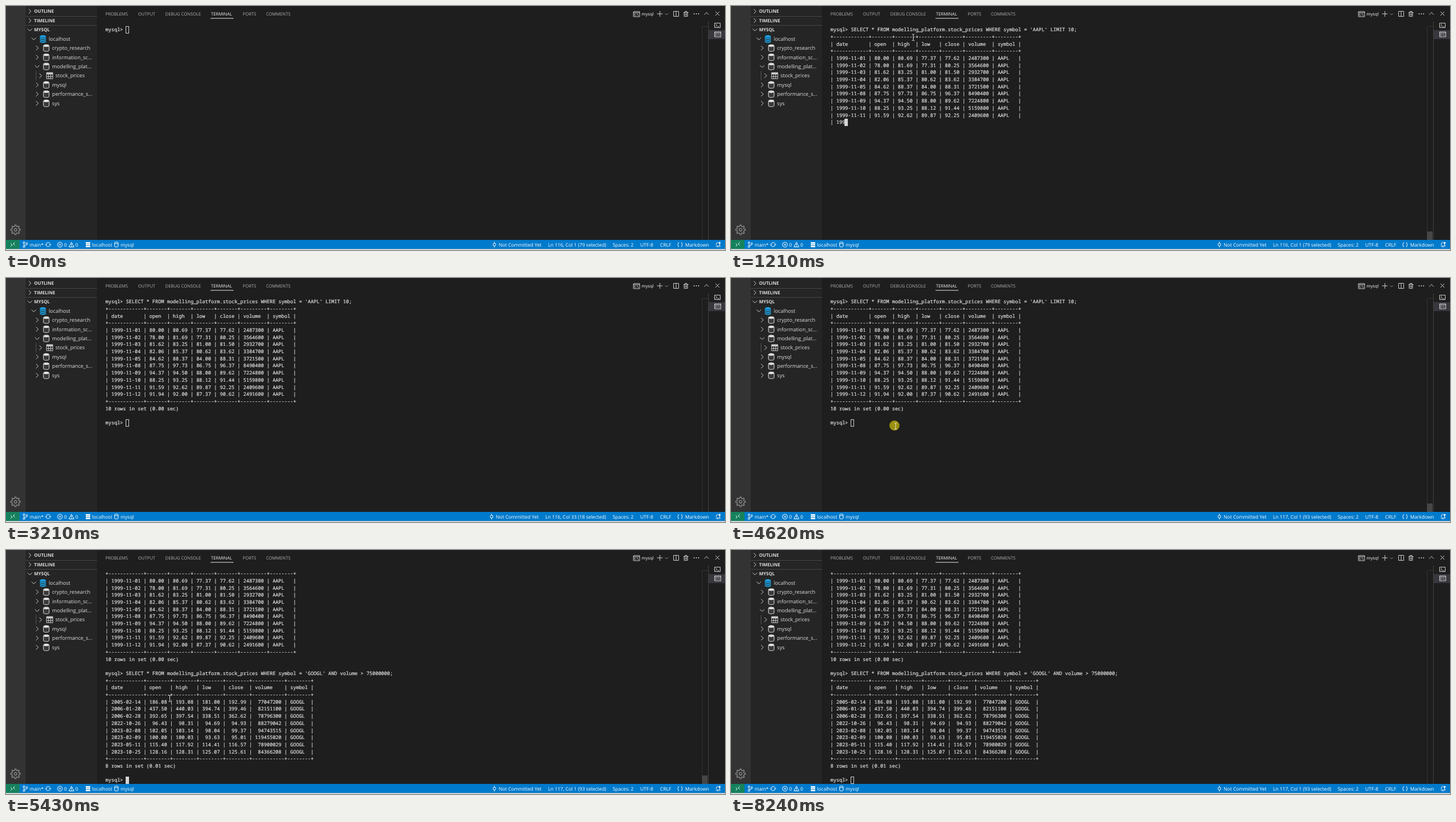
Recreate the animation shown at these times as an HTML page. Size 1280x435 px, loop 8440 ms.

```html
<!DOCTYPE html>
<html lang="en">
<head>
<meta charset="utf-8">
<title>Terminal query</title>
<style>
  html, body { margin: 0; width: 100%; height: 100%; overflow: hidden; background: #1e1e1e; }
  svg.stage { display: block; width: 100vw; height: 100vh; }
  text { white-space: pre; text-rendering: geometricPrecision; fill: #dedede; }
  .ui text { font-family: "Open Sans", "Noto Sans", sans-serif; }
  .head text { font-size: 8px; font-weight: 700; }
  .tree text { font-size: 9.2px; }
  .tabs text { font-size: 7.75px; fill: #b2b2b2; }
  .tabs .active { fill: #f4f4f4; }
  .status text { font-size: 8.6px; fill: #fff; }
  .term text { font: 8.71px "Noto Sans Mono", "DejaVu Sans Mono", monospace; stroke: #dedede; stroke-width: .22; }
  .line { fill: none; stroke: #d0d0d0; stroke-width: 1; }
  .status .line { stroke: #fff; }
</style>
</head>
<body>
<svg class="stage" viewBox="0 0 1280 435" preserveAspectRatio="none">
  <defs>
    <path id="right" class="line" d="M-2-4 2 0-2 4"/>
    <path id="down" class="line" d="M-4-2 0 2 4-2"/>
    <g id="db">
      <path d="M-5-4.2C-5-6.6 5-6.6 5-4.2V4.2C5 6.6-5 6.6-5 4.2Z" fill="#3a3a3a" stroke="#e4e4e4"/>
      <ellipse cy="-4" rx="4.6" ry="1.9" fill="#e4e4e4"/>
    </g>
    <g id="host" fill="#1ba1e2">
      <ellipse cy="-4.2" rx="5.5" ry="2.2"/>
      <path id="disk" d="M-5.5-2.9Q0 .4 5.5-2.9V-.7Q0 2.4-5.5-.7Z"/>
      <use href="#disk" y="3.2"/>
      <use href="#disk" y="6.4"/>
    </g>
    <g id="grid">
      <path d="M-5.5-5.5h11v11h-11z" class="line"/>
      <path d="M-5.5-5h11v2.6h-11z" fill="#d8d8d8"/>
      <path class="line" d="M-5.5 1.5h11M-1.8-3V5M1.9-3V5"/>
    </g>
    <g id="cmd">
      <path class="line" d="M-5.5-4.5h11v9h-11zM-5.5-2.5h11"/>
      <path class="line" stroke-width=".8" d="M-2-.5Q-4-.9-4 1T-2 2.5M-.4 0v.8M-.4 2v.8M1.3-.8 3.4 3"/>
    </g>
    <g id="ibeam" fill="none" stroke="#f0f0f0" stroke-width=".9">
      <path d="M-2.3-5.5H-.6L0-5 .6-5.5H2.3M0-5V5M-2.3 5.5H-.6L0 5 .6 5.5H2.3"/>
    </g>
    <path id="arrow" d="M.5.5V14l3.1-2.8 2.2 5 2.2-1-2.2-4.8h4.6Z" fill="#fff" stroke="#000" stroke-width=".8"/>
    <path id="hand" d="M3.2 8V1.6Q4.2 0 5.2 1.6V6.2Q10.5 6.6 10.5 9V12.5L9 16.4H4L.6 11Q.5 9.2 2 10L3.2 11Z"
          fill="#fff" stroke="#000" stroke-width=".8"/>
  </defs>

  <rect width="1280" height="435" fill="#1e1e1e"/>
  <rect width="35" height="418" fill="#333"/>
  <rect x="35" width="127" height="418" fill="#252526"/>

  <g class="ui head">
    <path d="M35 18.5H162M35 34.5H162" stroke="#48484a"/>
    <use href="#right" x="42.5" y="9.5"/><text x="50" y="12.3">OUTLINE</text>
    <use href="#right" x="42.5" y="26"/><text x="50" y="28.8">TIMELINE</text>
    <use href="#down" x="42.5" y="42.5"/><text x="50" y="45.3">MYSQL</text>
  </g>
  <g class="ui tree" id="tree">
    <path d="M53.5 116V132.5" stroke="#585858"/>
  </g>
  <g id="gear" transform="translate(17 399)" fill="none" stroke="#909090" stroke-width="1.3">
    <circle r="2.4"/>
  </g>

  <g class="ui tabs">
    <text x="177" y="17">PROBLEMS</text>
    <text x="235" y="17">OUTPUT</text>
    <text x="283.5" y="17">DEBUG CONSOLE</text>
    <text x="365" y="17" class="active">TERMINAL</text>
    <text x="421.5" y="17">PORTS</text>
    <text x="463" y="17">COMMENTS</text>
    <path d="M364 22H405" stroke="#e7e7e7"/>
    <use href="#cmd" x="1122.5" y="14.5"/>
    <text x="1131.5" y="17" class="active">mysql</text>
    <path class="line" d="M1159 14H1169M1164 9V19"/>
    <use href="#down" transform="translate(1176 14.5) scale(.65)"/>
    <path class="line" d="M1188.5 9.5h9v9h-9zM1193 9.5v9"/>
    <path class="line" d="M1206 11.5h9M1209 11V9.5h3V11M1207.3 12V18.5h6V12M1209.3 13v4M1211.5 13v4"/>
    <path d="M1224 14h2m2 0h2m2 0h2" stroke="#d0d0d0" stroke-width="1.6"/>
    <use href="#down" transform="translate(1247 13.5) scale(1 -1)"/>
    <path class="line" d="M1263 10 1270 17M1270 10 1263 17"/>
  </g>

  <path d="M1239.5 417V36.5H1250" fill="none" stroke="#343434"/>
  <rect x="1250" y="43" width="30" height="16" fill="#37373d"/>
  <path d="M1250.5 27V417" stroke="#414141"/>
  <path class="line" d="M1261.5 30.5h10v8h-10zM1263.5 32.5 1266 34.5 1263.5 36.5M1266.5 36.8h3"/>
  <use href="#cmd" x="1267" y="50.5"/>
  <rect id="thumb" x="1239" y="402" width="10" height="15" fill="#464646"/>

  <g class="ui status">
    <rect y="417" width="1280" height="16.3" fill="#007acc"/>
    <rect y="417" width="24" height="16.3" fill="#16825d"/>
    <rect y="433.3" width="1280" height="1.7" fill="#e8edf0"/>
    <path class="line" d="M8.5 423.5 11 426 8.5 428.7M15.5 421.5 13 424 15.5 426.5"/>
    <g class="line">
      <circle cx="32" cy="422" r="1.5"/><circle cx="32" cy="429" r="1.5"/><circle cx="37" cy="423.5" r="1.5"/>
      <path d="M32 423.5V427.5M37 425Q37 427 32.5 427"/>
      <path d="M71.2 425A4 4 0 0 1 78.5 423.5M78.8 425.5A4 4 0 0 1 71.5 427.2M77 425h3.5M69.5 426h3.5"/>
      <circle cx="96" cy="425.5" r="4.4"/><path d="M94 423.5 98 427.5M98 423.5 94 427.5"/>
      <path d="M116.5 421 121 429.5H112ZM116.5 424V427M116.5 427.8v1"/>
      <ellipse cx="196.5" cy="422.3" rx="3.2" ry="1.5"/>
      <path d="M193.3 422.3V428.6Q196.5 431 199.7 428.6V422.3"/>
      <path d="M1198 421.5Q1196.5 421.5 1196.8 424L1195.7 425.5 1196.8 427Q1196.5 429.5 1198 429.5M1202 421.5Q1203.5 421.5 1203.2 424L1204.3 425.5 1203.2 427Q1203.5 429.5 1202 429.5"/>
      <path d="M1263.5 428H1271.5L1270.3 426V424M1264.7 426V424Q1265 421.5 1267.5 421.3M1266.5 429.7h2"/>
    </g>
    <circle cx="1270.3" cy="422.3" r="1.8" fill="#fff"/>
    <path d="M142 421h8v2.4h-8zm0 3.2h8v2.4h-8zm0 3.2h8v2.6h-8z" fill="#fff"/>
    <text x="42" y="428.8">main*</text>
    <text x="103.5" y="428.8">0</text>
    <text x="123.5" y="428.8">0</text>
    <text x="153" y="428.8">localhost</text>
    <text x="204" y="428.8">mysql</text>
    <g id="commit">
      <circle class="line" cx="869.5" cy="425.5" r="2.5" stroke-width="1.3"/>
      <path class="line" d="M869.5 420.5V423M869.5 428V430.5"/>
      <text x="877" y="428.8">Not Committed Yet</text>
      <text x="965" y="428.8" id="position"></text>
    </g>
    <text x="1080" y="428.8">Spaces: 2</text>
    <text x="1129" y="428.8">UTF-8</text>
    <text x="1164.5" y="428.8">CRLF</text>
    <text x="1209" y="428.8">Markdown</text>
  </g>

  <g class="term" id="term"><rect id="cursor" height="12" stroke="#d4d4d4"/></g>
  <circle id="click" r="9" fill="#999010"/>
  <use id="pointer"/>
</svg>

<script>
const LOOP = 8440, CHAR = 5.226, LEFT = 177, TOP = 36, PITCH = 12.7, BASELINE = 9.1;
const $ = id => document.getElementById(id);

function add(parent, tag, attrs, content = "") {
  const el = document.createElementNS("http://www.w3.org/2000/svg", tag);
  set(el, attrs);
  el.textContent = content;
  return parent.appendChild(el);
}
function set(el, attrs) {
  for (const key in attrs) el.setAttribute(key, attrs[key]);
}
const show = (el, on) => { el.style.visibility = on ? "visible" : "hidden"; };

// Sidebar tree: [label, indent, icon, chevron]
[
  ["localhost", -6, "host", "down"],
  ["crypto_research", 0, "db", "right"],
  ["information_sc...", 0, "db", "right"],
  ["modelling_plat...", 0, "db", "down"],
  ["stock_prices", 6, "grid", "right"],
  ["mysql", 0, "db", "right"],
  ["performance_s...", 0, "db", "right"],
  ["sys", 0, "db", "right"],
].forEach(([label, indent, icon, chevron], i) => {
  const y = 58.5 + i * 16.43;
  add($("tree"), "use", { href: "#" + chevron, x: 55.5 + indent, y });
  add($("tree"), "use", { href: "#" + icon, x: 71.7 + indent, y });
  add($("tree"), "text", { x: 82 + indent, y: y + 3.2 }, label);
});

// Gear outline: eight teeth
const teeth = Array.from({ length: 32 }, (_, i) => {
  const angle = (i - 0.5) * Math.PI / 16, r = i % 4 < 2 ? 8.6 : 6.2;
  return `${(r * Math.cos(angle)).toFixed(2)} ${(r * Math.sin(angle)).toFixed(2)}`;
});
add($("gear"), "path", { d: `M${teeth.join("L")}Z` });

// Terminal contents
function table(data) {
  const rows = ["date open high low close volume symbol", ...data.trim().split("\n")]
    .map(row => row.trim().split(/\s+/));
  const widths = rows[0].map((_, c) => Math.max(...rows.map(row => row[c].length)));
  const rule = "+" + widths.map(w => "-".repeat(w + 2)).join("+") + "+";
  const lines = rows.map((row, r) => "| " + row.map((cell, c) =>
    r === 0 || c === 6 ? cell.padEnd(widths[c]) : cell.padStart(widths[c])).join(" | ") + " |");
  return [rule, lines[0], rule, ...lines.slice(1), rule];
}

const prompt = "mysql> ";
const select = prompt + "SELECT * FROM modelling_platform.stock_prices WHERE symbol = ";
const first = [
  select + "'AAPL' LIMIT 10;",
  ...table(`
    1999-11-01 80.00 80.69 77.37 77.62 2487300 AAPL
    1999-11-02 78.00 81.69 77.31 80.25 3564600 AAPL
    1999-11-03 81.62 83.25 81.00 81.50 2932700 AAPL
    1999-11-04 82.06 85.37 80.62 83.62 3384700 AAPL
    1999-11-05 84.62 88.37 84.00 88.31 3721500 AAPL
    1999-11-08 87.75 97.73 86.75 96.37 8490400 AAPL
    1999-11-09 94.37 94.50 88.00 89.62 7224800 AAPL
    1999-11-10 88.25 93.25 88.12 91.44 5159800 AAPL
    1999-11-11 91.59 92.62 89.87 92.25 2409600 AAPL
    1999-11-12 91.94 92.00 87.37 90.62 2491600 AAPL`),
  "10 rows in set (0.00 sec)", "",
];
const second = [
  select + "'GOOGL' AND volume > 75000000;",
  ...table(`
    2005-02-14 186.08 193.08 181.00 192.99 77047200 GOOGL
    2006-01-20 437.50 440.03 394.74 399.46 82151100 GOOGL
    2006-02-28 392.65 397.54 338.51 362.62 78796300 GOOGL
    2022-10-26 96.43 98.31 94.69 94.93 88279042 GOOGL
    2023-02-08 102.05 103.14 98.04 99.37 94743515 GOOGL
    2023-02-09 100.00 100.03 93.63 95.01 119455020 GOOGL
    2023-05-11 115.40 117.92 114.41 116.57 78900029 GOOGL
    2023-10-25 128.16 128.31 125.07 125.61 84366208 GOOGL`),
  "8 rows in set (0.01 sec)", "",
];

// Tracks of [start time, value]; each value holds until the next one
const screens = [
  [0, [prompt]],
  [1210, [...first.slice(0, 13), "| 199"]],
  [1410, [...first, prompt]],
  [5230, [...first, select.slice(0, 57)]],
  [5430, [...first.slice(3), ...second, prompt]],
];
const focus = [[0, false], [810, true], [3210, false], [4820, true], [8240, false]];
const thumb = [[0, false], [400, true], [2810, false], [4420, true], [7230, false]];
const positions = [
  [0, "Ln 116, Col 1 (79 selected)"],
  [3210, "Ln 116, Col 33 (18 selected)"],
  [3420, "Ln 117, Col 1 (93 selected)"],
];
const clicks = [[0, null], [810, [323, 56]], [1010, null], [4620, [291, 263]], [4820, null]];
const pointers = [
  [0, null], [200, ["arrow", 1157, 399]], [400, ["ibeam", 387, 109]],
  [610, ["ibeam", 328, 61]], [810, ["ibeam", 324.5, 56]], [2410, null],
  [4220, ["ibeam", 324.5, 189]], [4420, ["ibeam", 306, 242]],
  [4620, ["ibeam", 293, 264]], [5020, ["ibeam", 291.5, 264.7]],
  [6430, ["ibeam", 309.5, 271]], [6630, ["ibeam", 860, 419]],
  [6830, ["hand", 1233, 418]], [7230, null],
];
const tracks = [screens, focus, thumb, positions, clicks, pointers];
const valueAt = (track, t) => track.findLast(([start]) => start <= t)[1];
const cuts = [...new Set(tracks.flat().map(([start]) => start))].sort((a, b) => a - b);

const rows = Array.from({ length: 30 }, (_, i) =>
  add($("term"), "text", { x: LEFT, y: TOP + BASELINE + i * PITCH }));

function draw(t) {
  const [lines, focused, scrolling, position, click, pointer] = tracks.map(track => valueAt(track, t));
  rows.forEach((row, i) => { row.textContent = lines[i] || ""; });
  const last = lines.length - 1;
  set($("cursor"), {
    x: Math.round(LEFT + lines[last].length * CHAR) - 0.5,
    y: Math.round(TOP + last * PITCH) + 0.5,
    width: 5,
    fill: focused ? "#d4d4d4" : "none",
  });
  show($("thumb"), scrolling);
  $("position").textContent = position;
  $("commit").setAttribute("transform", `translate(${position.includes("Col 33") ? -5 : 0} 0)`);
  show($("click"), click);
  if (click) set($("click"), { cx: click[0], cy: click[1] });
  show($("pointer"), pointer);
  if (pointer) set($("pointer"), { href: "#" + pointer[0], x: pointer[1], y: pointer[2] });
}

const begin = performance.now();
let shown = -1;
function tick() {
  const t = (performance.now() - begin) % LOOP;
  const cut = cuts.findLast(start => start <= t);
  if (cut !== shown) draw(shown = cut);
  requestAnimationFrame(tick);
}
tick();
</script>
</body>
</html>
```
